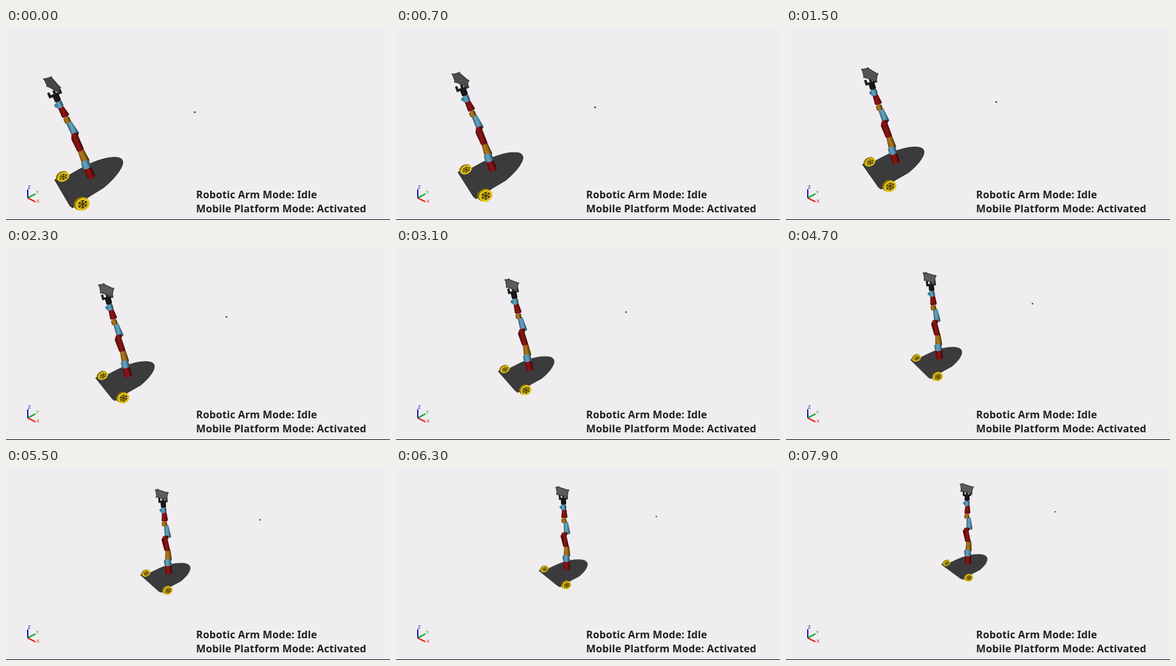
An HTML page with a canvas that plays this animation: 600 by 301 pixels, repeating every 8 s.

```html
<!DOCTYPE html>
<html>
<head>
<meta charset="utf-8">
<style>
html, body { margin: 0; width: 100%; height: 100%; overflow: hidden; background: #efedef; }
canvas { display: block; }
</style>
</head>
<body>
<canvas id="stage" width="600" height="301"></canvas>
<script>
const ctx = document.getElementById('stage').getContext('2d');
const LOOP = 8000, STEP = 100;

// Projected anchor positions at a few moments (seconds)
const keys = [0, 1.5, 2.3, 3.1, 4.7, 6.3, 7.9];
const tracks = {
  base:   [[133, 172, 191, 209, 240, 267, 284.5], [233, 210, 200, 190, 172.5, 157.5, 148.5]],
  collar: [[82.5, 137, 162, 186, 228, 262, 283], [117, 98, 90, 81, 69, 59, 53]],
  left:   [[89, 131, 151, 170, 204, 232, 251], [233, 210, 200, 190, 172.5, 158.5, 149]],
  right:  [[119, 162, 183, 202.5, 237, 266.5, 285.5], [276, 248, 235, 222.5, 201.5, 183.5, 172]],
  nose:   [[182, 215, 231, 246, 273.5, 297.5, 312.5], [208, 191.5, 182.5, 174.5, 159.5, 147, 138.5]],
  dot:    [[295, 328.5, 344.5, 359.5, 385, 406.7, 420.5], [132, 116, 108, 100.5, 87.3, 76, 68.7]]
};
const wheelRadius = [12, 10.6, 10, 9.3, 8.4, 7.6, 7];

// Panel outline relative to the collar
const panelKeys = [0, 1.5, 3.1, 7.9];
const panel = [
  [[-23, -18, -15, -10], [-37, -33, -31, -27]],
  [[-12, -9, -10, -7], [-40, -35, -32, -28]],
  [[2, 6, 5, 9], [-24, -26, -26, -23]],
  [[0, 4, 3, 7], [-16, -14, -14, -13]],
  [[-18, -15, -13, -9], [-26, -21, -20, -17]]
];

// Arm links: start, end along the arm; offsets when tilted and upright; widths; colour
const RED = '#8f1414', BLUE = '#62a5c6', GOLD = '#ad781c', BLACK = '#1b1b1d';
const links = [
  [0, .11, 0, 0, 0, 0, 13, 12, RED],
  [.20, .35, 1.5, 1, 1.5, 1.5, 13, 10, GOLD],
  [.13, .19, 0, 0, 0, -1, 14, 13, BLUE],
  [.56, .73, 4, 3, 2, 2, 12, 9, BLUE],
  [.36, .52, 1.5, 0, 1, -3, 11, 12, RED],
  [.54, .56, 2, -2, 3, -1, 12, 11, RED],
  [.74, .78, 1, -1, 1, -1, 10, 10, GOLD],
  [.82, .93, 1.5, 0, 0, .5, 12, 9, RED],
  [.95, 1, -.5, -.5, 0, 0, 11, 10, BLUE],
  [1.03, 1.1, 0, 0, 0, 0, 10, 10, BLACK]
];

const deck = new Path2D('M76 238L82 235L98 231C112 223 125 215 138 210C153 204 165 202 174 203' +
  'C183 204 184 210 181 217C176 228 165 240 153 250L132 263L104 282L100 279Z');

const mix = (a, b, k) => a + (b - a) * k;

// Smooth curve through unevenly spaced keys
function curve(ts, vs, t) {
  let i = 0;
  while (i < ts.length - 2 && t > ts[i + 1]) i++;
  const slope = j => (vs[j + 1] - vs[j]) / (ts[j + 1] - ts[j]);
  const tangent = j => {
    if (j === 0) return slope(0) * 1.5 - tangent(1) * .5;
    if (j === ts.length - 1) return slope(j - 1);
    const a = ts[j] - ts[j - 1], b = ts[j + 1] - ts[j];
    return (slope(j - 1) * b + slope(j) * a) / (a + b);
  };
  const h = ts[i + 1] - ts[i], u = (t - ts[i]) / h;
  return vs[i] * (1 + 2 * u) * (1 - u) ** 2 + tangent(i) * h * u * (1 - u) ** 2 +
    vs[i + 1] * u * u * (3 - 2 * u) + tangent(i + 1) * h * u * u * (u - 1);
}

const point = ([xs, ys], t, ts = keys) => [curve(ts, xs, t), curve(ts, ys, t)];
const frame = (o, a, b) =>
  new DOMMatrix([a[0] - o[0], a[1] - o[1], b[0] - o[0], b[1] - o[1], o[0], o[1]]);
const deckRest = frame(...['left', 'right', 'nose'].map(n => point(tracks[n], 0))).inverse();

function line(color, width, ...pts) {
  ctx.strokeStyle = color;
  ctx.lineWidth = width;
  ctx.beginPath();
  pts.forEach(p => ctx.lineTo(...p));
  ctx.stroke();
}

function oval(x, y, rx, ry, color) {
  ctx.fillStyle = color;
  ctx.beginPath();
  ctx.ellipse(x, y, rx, ry, 0, 0, 7);
  ctx.fill();
}

function wheel([x, y], r, flat) {
  ctx.save();
  ctx.translate(x, y);
  ctx.rotate(-.5);
  ctx.scale(r / 12, r / 12);
  oval(-1, -1.5, 12, 10 * flat, '#8c7407');
  oval(.5, .8, 11.5, 9.6 * flat, '#e3c417');
  oval(.5, .8, 7.8, 6.3 * flat, '#4d410f');
  for (let i = 0; i < 3; i++) {
    const a = .4 + i * Math.PI / 3, dx = 8 * Math.cos(a), dy = 6.5 * flat * Math.sin(a);
    line('#cfb014', 1.9, [.5 - dx, .8 - dy], [.5 + dx, .8 + dy]);
  }
  oval(.5, .8, 2.8, 2.5 * flat, '#56480e');
  ctx.restore();
}

// Drawn in the arm's own frame: y runs toward the tip
function link([a, b, oa0, oa1, ob0, ob1, wa, wb, color], k, len, s) {
  const xa = mix(oa0, oa1, k), xb = mix(ob0, ob1, k);
  const ra = wa * s / 2, rb = wb * s / 2, ya = -a * len, yb = -b * len;
  const g = ctx.createLinearGradient(xa - ra, 0, xa + ra, 0);
  g.addColorStop(0, '#0006');
  g.addColorStop(.35, '#0000');
  g.addColorStop(.65, '#0002');
  g.addColorStop(1, '#000a');
  ctx.beginPath();
  ctx.moveTo(xa - ra, ya);
  ctx.lineTo(xb - rb, yb);
  ctx.ellipse(xb, yb, rb, rb * .45, 0, Math.PI, 2 * Math.PI);
  ctx.lineTo(xa + ra, ya);
  ctx.ellipse(xa, ya, ra, ra * .45, 0, 0, Math.PI);
  for (const fill of [color, g]) {
    ctx.fillStyle = fill;
    ctx.fill();
  }
}

function arm(base, collar) {
  const dx = collar[0] - base[0], dy = collar[1] - base[1];
  const len = Math.hypot(dx, dy), s = len / 127, k = 1 + dx / 51;
  ctx.save();
  ctx.translate(...base);
  ctx.rotate(Math.atan2(dx, -dy));
  links.forEach(l => link(l, k, len, s));
  oval(-6 * s, -.98 * len, 2.5 * s, 3 * s, '#3f7f9f');
  const grip = mix(9, 5, k), y = -1.1 * len;
  line(BLACK, 4 * s, [-grip, y - 8], [-grip, y - 1], [grip, y - 1], [grip, y - 8]);
  line(BLACK, 4 * s, [0, y], [0, y - 8]);
  ctx.restore();
}

function head(collar, t) {
  const pts = panel.map(p => point(p, t, panelKeys).map((v, i) => v + collar[i]));
  ctx.beginPath();
  pts.forEach(p => ctx.lineTo(...p));
  ctx.closePath();
  const shade = mix(70, 92, Math.min(1, t / 2.5));
  ctx.fillStyle = `rgb(${shade},${shade},${shade})`;
  ctx.fill();
  line('#333335', 1.2, ...pts, pts[0]);
  pts.forEach(([x, y]) => oval(x, y, 1.6, 1.6, '#48484a'));
}

function label(text, x, y, color, font) {
  ctx.fillStyle = color;
  ctx.font = font;
  ctx.fillText(text, x, y);
}

function overlay() {
  const font = '600 16px "Noto Sans", "Open Sans", sans-serif';
  ctx.letterSpacing = '0.1px';
  label('Robotic Arm Mode: Idle', 297, 267, '#202022', font);
  label('Mobile Platform Mode: Activated', 297, 289, '#202022', font);
  ctx.letterSpacing = '0px';
  const axes = [['X', '#e8231c', 46, 272.5, 47.5, 274], ['Y', '#12a52c', 46, 260, 47, 259.5],
    ['Z', '#1616b8', 34, 253, 34, 251.5]];
  for (const [name, color, x, y, tx, ty] of axes) {
    line(color, 2, [34, 266.5], [x, y]);
    label(name, tx, ty, color, '7px "DejaVu Sans", sans-serif');
  }
  ctx.fillStyle = '#111';
  ctx.fillRect(0, 300, 600, 1);
}

function draw(t) {
  const at = Object.fromEntries(Object.entries(tracks).map(([n, p]) => [n, point(p, t)]));
  const r = curve(keys, wheelRadius, t);
  ctx.fillStyle = '#efedef';
  ctx.fillRect(0, 0, 600, 301);

  ctx.save();
  ctx.setTransform(frame(at.left, at.right, at.nose).multiply(deckRest));
  ctx.fillStyle = '#3b3a3c';
  ctx.fill(deck);
  ctx.strokeStyle = '#2b2a2c';
  ctx.lineWidth = 1;
  ctx.stroke(deck);
  ctx.restore();

  wheel(at.left, r * .87, .84);
  wheel(at.right, r, 1);
  arm(at.base, at.collar);
  head(at.collar, t);

  const d = mix(2.5, 1.9, t / 8);
  ctx.fillStyle = '#3a3a3c';
  ctx.fillRect(at.dot[0] - d / 2, at.dot[1] - d / 2, d, d);
  overlay();
}

function tick() {
  draw(Math.floor(performance.now() % LOOP / STEP) * STEP / 1000);
  requestAnimationFrame(tick);
}
tick();
</script>
</body>
</html>
```
